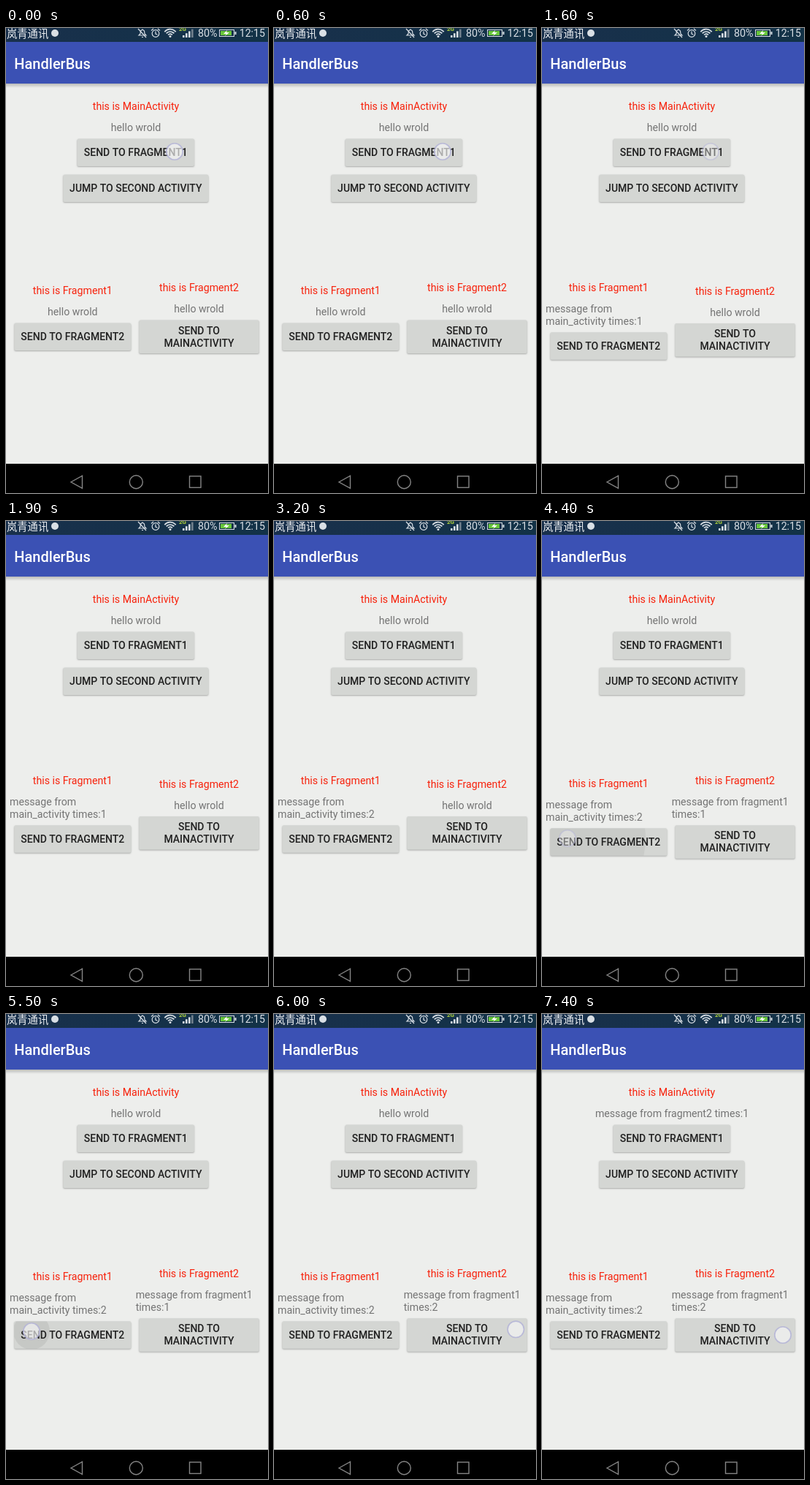
Animation, 359 px wide and 636 px high, one loop 8 s. Source, as an HTML page with a canvas:

```html
<!DOCTYPE html>
<html lang="en">
<head>
<meta charset="utf-8">
<title>HandlerBus</title>
<style>
html, body { margin: 0; width: 100%; height: 100%; overflow: hidden; background: #000; }
canvas { display: block; width: 359px; height: 636px; }
</style>
</head>
<body>
<canvas id="stage" width="359" height="636"></canvas>
<script>
const ctx = document.getElementById('stage').getContext('2d');
const LOOP = 8000, STEP = 100, DOT_FADE = 250;
const RED = '#f7220c', GREY = '#747474', INK = '#202020';

// The dot fades after "up"; the button ripple runs from "ripple" to "gone".
const touches = [
  { down: 0, up: 1500, ripple: 1700, gone: 1900, x: 231, y: 169, target: 'main' },
  { down: 2600, up: 2800, ripple: 2700, gone: 3200, x: 231, y: 169, target: 'main' },
  { down: 4300, up: 4300, ripple: 4300, gone: 4800, x: 35, y: 434, target: 'first' },
  { down: 5500, up: 5500, ripple: 5500, gone: 5800, x: 35, y: 434, target: 'first' },
  { down: 6000, up: 6800, ripple: 6900, gone: 7000, x: 331.3, y: 431.3, target: 'second' },
  { down: 7200, up: LOOP, ripple: LOOP, gone: LOOP, x: 330, y: 439, target: 'second' }
];

function text(str, x, y, { size = 14.15, weight = 400, color = GREY, align = 'center' } = {}) {
  ctx.font = `${weight} ${size}px Roboto, "Noto Sans CJK SC", "Noto Sans CJK", sans-serif`;
  ctx.fillStyle = color;
  ctx.textAlign = align;
  ctx.fillText(str, x, y);
}

function path(points, close) {
  ctx.beginPath();
  points.forEach(([x, y]) => ctx.lineTo(x, y));
  if (close) ctx.closePath();
}

function line(...points) {
  path(points);
  ctx.stroke();
}

function arc(x, y, r, from = 0, to = Math.PI * 2) {
  ctx.beginPath();
  ctx.arc(x, y, r, from, to);
}

function button(name, x, y, w, h, labels, t) {
  ctx.save();
  ctx.shadowColor = 'rgba(0,0,0,.28)';
  ctx.shadowBlur = 2;
  ctx.shadowOffsetY = 1;
  ctx.fillStyle = '#d4d6d3';
  ctx.beginPath();
  ctx.roundRect(x, y, w, h, 2);
  ctx.fill();
  ctx.restore();

  const touch = touches.find(p => p.target === name && t >= p.ripple && t < p.gone);
  if (touch) {
    const age = t - touch.ripple;
    const fade = 1 - age / (touch.gone - touch.ripple);
    ctx.save();
    ctx.clip();
    ctx.fillStyle = `rgba(0,0,0,${0.065 * fade})`;
    arc(touch.x, touch.y, 25 + 0.82 * age);
    ctx.fill();
    ctx.restore();
  }
  const base = y + h / 2 + 5 - (labels.length - 1) * 8.5;
  labels.forEach((label, i) =>
    text(label, x + w / 2, base + i * 17, { size: 14, weight: 500, color: INK }));
}

function fragment({ name, title, x, left, base, message, labels, width, height }, t) {
  text(title, x, base, { color: RED });
  if (message.length > 1) {
    message.forEach((row, i) => text(row, left, base + 29 + i * 17, { align: 'left' }));
  } else {
    text(message[0], x, base + 29.3);
  }
  const top = base + (message.length > 1 ? 56.2 : 39.6);
  button(name, x - width / 2, top, width, height, labels, t);
}

function statusBar() {
  const shade = ctx.createLinearGradient(0, 0, 359, 0);
  shade.addColorStop(0, '#19304c');
  shade.addColorStop(1, '#123247');
  ctx.fillStyle = shade;
  ctx.fillRect(0, 0, 359, 19);

  const pale = '#d9dfe5';
  text('岚青通讯', 1, 12.5, { size: 14.3, color: '#eef1f4', align: 'left' });
  ctx.fillStyle = ctx.strokeStyle = pale;
  arc(67, 7, 5);
  ctx.fill();
  ctx.lineWidth = 1.2;

  // muted bell
  path([[182, 10], [184, 8], [184.5, 4], [187, 2], [189.5, 4], [190, 8], [192, 10]], true);
  ctx.stroke();
  line([181, 1], [192, 13]);
  line([186, 12.5], [188, 12.5]);

  // alarm clock
  arc(205, 7.5, 4.8);
  ctx.stroke();
  line([205, 4.5], [205, 8], [207.5, 9]);
  line([199, 3.5], [202, 1]);
  line([208, 1], [211, 3.5]);

  // wifi
  ctx.lineWidth = 1.7;
  [3.8, 7, 10.3].forEach(r => {
    arc(225, 12, r, -Math.PI * 0.77, -Math.PI * 0.23);
    ctx.stroke();
  });
  arc(225, 11.5, 1.5);
  ctx.fill();

  // signal
  text('2G', 242, 3.5, { size: 8, weight: 700, color: '#b2d43b' });
  for (let i = 0; i < 4; i++) {
    const h = 3 + i * 2.8;
    ctx.fillStyle = i < 3 ? pale : '#71808d';
    ctx.fillRect(242 + i * 4, 13 - h, 2.6, h);
  }

  // battery
  text('80%', 263, 12, { size: 14.3, color: pale, align: 'left' });
  ctx.strokeStyle = ctx.fillStyle = pale;
  ctx.lineWidth = 1;
  ctx.strokeRect(292.5, 2.5, 20, 9);
  ctx.fillRect(313.5, 5, 2, 4);
  ctx.fillStyle = '#68c63b';
  ctx.fillRect(294, 4, 15, 6);
  ctx.fillStyle = '#fff';
  path([[303, 3], [298, 8], [302, 8], [300, 11], [306, 6], [302, 6]], true);
  ctx.fill();
  text('12:15', 355, 12, { size: 14.2, color: pale, align: 'right' });
}

function appBar() {
  const shadow = ctx.createLinearGradient(0, 76, 0, 82);
  shadow.addColorStop(0, 'rgba(0,0,0,.22)');
  shadow.addColorStop(1, 'rgba(0,0,0,0)');
  ctx.fillStyle = shadow;
  ctx.fillRect(0, 76, 359, 6);
  ctx.fillStyle = '#3b51b4';
  ctx.fillRect(0, 19, 359, 57);
  text('HandlerBus', 11.3, 55.5, { size: 20, weight: 500, color: '#fff', align: 'left' });
}

function navBar() {
  ctx.fillStyle = '#000';
  ctx.fillRect(0, 596, 359, 40);
  ctx.strokeStyle = '#858585';
  ctx.lineWidth = 1.4;
  path([[89, 621], [104.5, 612.5], [104.5, 629.5]], true);
  ctx.stroke();
  arc(178.3, 621, 9);
  ctx.stroke();
  ctx.strokeRect(251.5, 613, 15.5, 15.5);
}

function touchDot(t) {
  const touch = touches.find(p => t >= p.down && t < p.gone);
  if (!touch) return;
  ctx.save();
  ctx.globalAlpha = Math.min(1, Math.max(0, 1 - (t - touch.up) / DOT_FADE));
  arc(touch.x, touch.y, 11.2);
  ctx.fillStyle = 'rgba(246,246,246,.65)';
  ctx.fill();
  ctx.strokeStyle = 'rgba(178,178,214,.85)';
  ctx.lineWidth = 1.6;
  ctx.stroke();
  ctx.restore();
}

function draw(t) {
  const firstCount = t < 1600 ? 0 : t < 2900 ? 1 : 2;
  const secondCount = t < 4400 ? 0 : t < 5600 ? 1 : 2;
  const uneven = firstCount > 0 && secondCount === 0;

  ctx.fillStyle = '#edeeec';
  ctx.fillRect(0, 0, 359, 636);
  statusBar();
  appBar();

  text('this is MainActivity', 178, 112, { color: RED });
  text(t < 6900 ? 'hello wrold' : 'message from fragment2 times:1', 178, 141.3);
  button('main', 97.5, 151.5, 160.5, 37.5, ['SEND TO FRAGMENT1'], t);
  button('jump', 78.3, 200.5, 199, 37.5, ['JUMP TO SECOND ACTIVITY'], t);

  fragment({
    name: 'first', title: 'this is Fragment1', x: 91.3, left: 5, base: uneven ? 360 : 364,
    message: firstCount ? ['message from', `main_activity times:${firstCount}`] : ['hello wrold'],
    labels: ['SEND TO FRAGMENT2'], width: 160, height: 37.5
  }, t);
  fragment({
    name: 'second', title: 'this is Fragment2', x: 264.5, left: 177.7, base: uneven ? 364.5 : 360,
    message: secondCount ? ['message from fragment1', `times:${secondCount}`] : ['hello wrold'],
    labels: ['SEND TO', 'MAINACTIVITY'], width: 164.5, height: 45.5
  }, t);

  touchDot(t);
  navBar();
}

const start = performance.now();
function tick() {
  const t = (performance.now() - start) % LOOP;
  draw(Math.floor(t / STEP) * STEP);
  requestAnimationFrame(tick);
}
tick();
</script>
</body>
</html>
```
